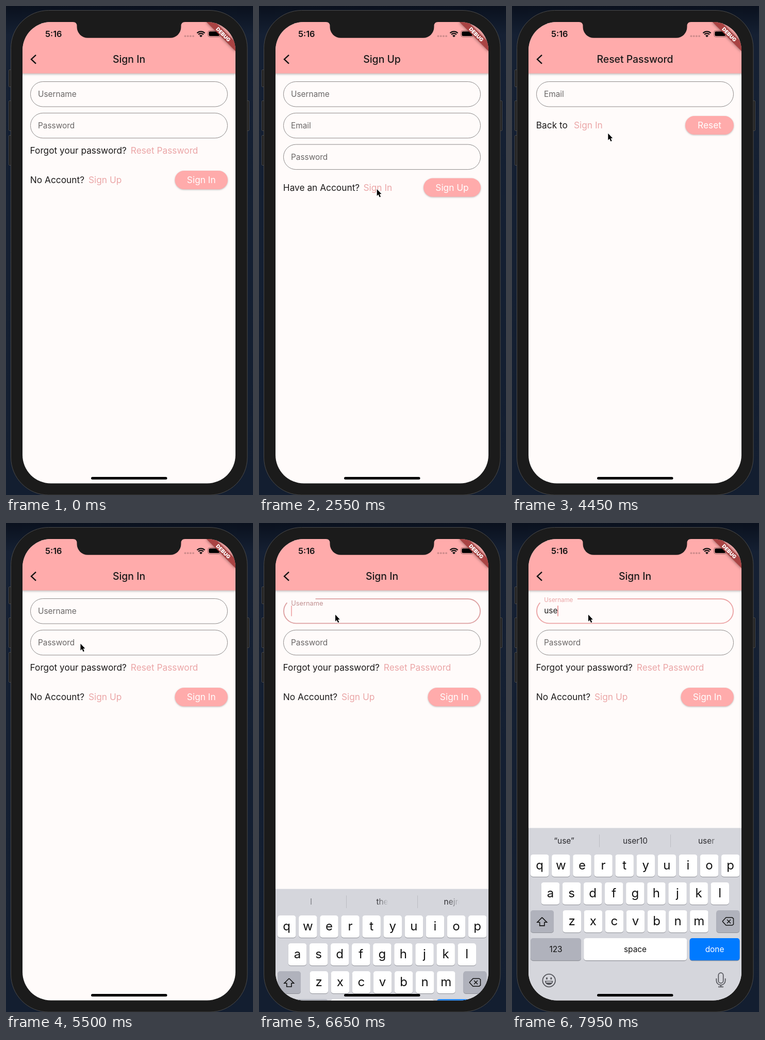
An HTML page with a canvas for the animation above (8000 ms loop, 479x947 px).

```html
<!DOCTYPE html>
<html lang="en">
<head>
<meta charset="utf-8">
<title>Sign in flow</title>
<style>
html, body { margin: 0; width: 100%; height: 100%; overflow: hidden; background: #131e30; }
canvas { display: block; width: 479px; height: 947px; }
</style>
</head>
<body>
<canvas id="stage"></canvas>
<script>
const W = 479, H = 947, LOOP = 8000;
const canvas = document.getElementById('stage');
const c = canvas.getContext('2d');
const dpr = window.devicePixelRatio || 1;
canvas.width = W * dpr;
canvas.height = H * dpr;

const PINK = '#ffabab', LINK = '#eba6a7', INK = '#1c1a1a', GREY = '#8d8a8a', HINT = '#6a6767';
const BODY = 17.3, FIELD = 15.4;

const clamp = v => Math.max(0, Math.min(1, v));
const lerp = (a, b, p) => a + (b - a) * p;
const smooth = p => p * p * (3 - 2 * p);
const span = (t, a, b) => clamp((t - a) / (b - a));
const mix = (a, b, p) => `rgb(${a.map((v, i) => Math.round(lerp(v, b[i], p)))})`;

function rr(x, y, w, h, r) {
  c.beginPath();
  c.roundRect(x, y, w, h, r);
}
function box(x, y, w, h, r, fill) {
  rr(x, y, w, h, r);
  c.fillStyle = fill;
  c.fill();
}
function line(points, width, color) {
  c.beginPath();
  points.forEach(([x, y], i) => i ? c.lineTo(x, y) : c.moveTo(x, y));
  c.lineWidth = width;
  c.strokeStyle = color;
  c.stroke();
}
// cy is the middle of the capital letters
function text(s, x, cy, size, color, align = 'left', weight = 400) {
  c.font = `${weight} ${size}px Inter, sans-serif`;
  c.textAlign = align;
  c.fillStyle = color;
  c.fillText(s, x, cy + size * 0.364);
}

/* ---------- phone ---------- */

function drawPhone() {
  const g = c.createLinearGradient(0, 0, 0, H);
  g.addColorStop(0, '#0a111e');
  g.addColorStop(0.06, '#152033');
  g.addColorStop(1, '#131e30');
  c.fillStyle = g;
  c.fillRect(0, 0, W, H);
  c.lineWidth = 1;
  c.strokeStyle = '#484848';
  for (const [x, y, h] of [[5.5, 123.5, 33], [5.5, 183.5, 58], [5.5, 250.5, 58], [464.5, 183.5, 58]]) {
    box(x, y, 7, h, 1.5, '#202020');
    c.stroke();
  }
  box(9.5, 8.5, 458.5, 938.5, 73, '#1b1b1b');
  c.strokeStyle = '#4a4a4a';
  c.stroke();
}

function drawNotch() {
  c.beginPath();
  c.moveTo(130, 30);
  c.lineTo(130, 31);
  c.quadraticCurveTo(137.5, 31, 137.5, 39);
  c.arcTo(137.5, 61.8, 158, 61.8, 21);
  c.lineTo(319, 61.8);
  c.arcTo(339.5, 61.8, 339.5, 40, 21);
  c.lineTo(339.5, 39);
  c.quadraticCurveTo(339.5, 31, 347, 31);
  c.lineTo(347, 30);
  c.fillStyle = '#1b1b1b';
  c.fill();
}

function drawStatus() {
  text('5:16', 76, 54.5, 16.3, '#111', 'left', 600);
  for (let i = 0; i < 4; i++) {
    c.beginPath();
    c.arc(347.5 + i * 5.2, 58.3, 1.9, 0, 7);
    c.fillStyle = '#cd8b8b';
    c.fill();
  }
  c.strokeStyle = '#111';
  c.lineWidth = 2.3;
  for (const r of [10.6, 6.9]) {
    c.beginPath();
    c.arc(378, 60, r, Math.PI * 1.25, Math.PI * 1.75);
    c.stroke();
  }
  c.beginPath();
  c.moveTo(378, 60.5);
  c.arc(378, 60.5, 4.2, Math.PI * 1.25, Math.PI * 1.75);
  c.fillStyle = '#111';
  c.fill();
  rr(391.5, 47.5, 24, 12.5, 4);
  c.lineWidth = 1;
  c.strokeStyle = '#9c6767';
  c.stroke();
  box(393.3, 49.3, 20.4, 9, 2.4, '#000');
}

function drawBanner() {
  c.save();
  c.translate(421.3, 55);
  c.rotate(Math.PI / 4);
  c.shadowColor = 'rgba(0,0,0,.5)';
  c.shadowBlur = 6 * dpr;
  c.fillStyle = '#a94343';
  c.fillRect(-40, -6, 80, 12);
  c.shadowColor = 'transparent';
  text('DEBUG', 0, 0, 10, '#fff', 'center', 900);
  c.restore();
}

function drawHeader(title) {
  c.save();
  c.shadowColor = 'rgba(0,0,0,.28)';
  c.shadowBlur = 4 * dpr;
  c.shadowOffsetY = 1.5 * dpr;
  c.fillStyle = PINK;
  c.fillRect(25, 25, 427, 105.5);
  c.restore();
  line([[58, 94.8], [49, 103.2], [58, 111.6]], 2.4, '#111');
  text(title, 238.5, 103.2, 19.4, INK, 'center', 500);
}

/* ---------- pages ---------- */

const PAGES = {
  signIn: { title: 'Sign In', fields: ['Username', 'Password'], ask: 'No Account?', link: 'Sign Up',
            linkX: 160, button: 'Sign In', left: 327.5, row: 337 },
  signUp: { title: 'Sign Up', fields: ['Username', 'Email', 'Password'], ask: 'Have an Account?', link: 'Sign In',
            linkX: 202.5, button: 'Sign Up', left: 319, row: 351.6 },
  reset: { title: 'Reset Password', fields: ['Email'], ask: 'Back to', link: 'Sign In',
           linkX: 120, button: 'Reset', left: 336, row: 231 }
};

function pageAt(t) {
  if (t >= 1400 && t < 2750) return PAGES.signUp;
  if (t >= 3800 && t < 5500) return PAGES.reset;
  return PAGES.signIn;
}

function drawField(label, y) {
  rr(47.5, y, 382, 48.5, 24.25);
  c.lineWidth = 1;
  c.strokeStyle = GREY;
  c.stroke();
  text(label, 62, y + 24, FIELD, HINT);
}

const TYPED = [
  [7550, 'u', ['“u”', 'us', 'up']],
  [7650, 'us', ['“us”', 'use', 'user']],
  [7770, 'use', ['“use”', 'user10', 'user']]
];
const typedAt = t => TYPED.filter(k => t >= k[0]).pop();

function drawFocused(label, y, t) {
  const u = span(t, 6570, 6770);
  // material style ease: quick start, soft landing
  const p = u < 0.2 ? 2.6 * u * u : lerp(0.104, 1, 1 - Math.pow(1 - (u - 0.2) / 0.8, 3.4));
  const color = mix([141, 138, 138], [236, 165, 166], clamp(p * 1.25));
  const r = 23.7, l = 48, right = 429, top = y + 0.4, bottom = y + 47.9, mid = (top + bottom) / 2;
  c.beginPath();
  c.moveTo(55 + 72 * Math.pow(p, 0.7), top);
  c.arc(right - r, mid, r, -Math.PI / 2, Math.PI / 2);
  c.arc(l + r, mid, r, Math.PI / 2, lerp(1.5, 1.24, clamp(p * 4)) * Math.PI);
  c.lineWidth = lerp(1, 1.9, clamp(p * 2));
  c.strokeStyle = color;
  c.stroke();
  text(label, 62.2, lerp(y + 24, y + 1.8, p), FIELD * lerp(1, 0.75, p), mix([106, 103, 103], [235, 164, 165], p));

  const word = typedAt(t);
  let x = 63;
  if (word) {
    text(word[1], 62.2, 169, FIELD, INK);
    x = 62.8 + c.measureText(word[1]).width;
  }
  c.globalAlpha = word ? 1 : span(t, 6570, 6670) * (1 - span(t, 7160, 7350));
  c.fillStyle = '#efa3a4';
  c.fillRect(x - 1, 160, 2, 20.5);
  c.globalAlpha = 1;
}

function drawPage(page, t) {
  drawHeader(page.title);
  page.fields.forEach((label, i) => {
    const y = 146.5 + i * 60.8;
    if (i === 0 && t >= 6570) drawFocused(label, y, t);
    else drawField(label, y);
  });
  if (page === PAGES.signIn) {
    text('Forgot your password?', 46.5, 279.3, BODY, INK);
    text('Reset Password', 241.8, 279.3, BODY, LINK);
  }
  text(page.ask, 46.8, page.row, BODY, INK);
  text(page.link, page.linkX, page.row, BODY, LINK);
  c.save();
  c.shadowColor = 'rgba(0,0,0,.26)';
  c.shadowBlur = 3 * dpr;
  c.shadowOffsetY = dpr;
  box(page.left, page.row - 18, 430 - page.left, 36, 18, PINK);
  c.restore();
  text(page.button, (page.left + 430) / 2, page.row, BODY, '#fff', 'center');
}

/* ---------- keyboard ---------- */

const KEY_ROWS = [['qwertyuiop', 36], ['asdfghjkl', 56.7], ['zxcvbnm', 98.5]];

function drawKey(x, y, w, fill = '#fff') {
  box(x, y + 1.1, w, 43, 5, '#8f9198');
  box(x, y, w, 43, 5, fill);
}

function drawSuggestions(t, y) {
  const word = typedAt(t);
  const start = word ? word[0] : 6566;
  const words = word ? word[2] : ['I', 'the', 'nejrd'];
  words.forEach((s, i) => {
    const mid = 101 + i * 138;
    const lag = word && i === 2 ? 60 : 0;
    const edge = mid + lerp(-38, 42, span(t, start + lag, start + lag + 180));
    const g = c.createLinearGradient(edge - 12, 0, edge + 12, 0);
    g.addColorStop(0, 'rgba(40,40,44,1)');
    g.addColorStop(1, 'rgba(40,40,44,0)');
    text(s, mid, y, FIELD, g, 'center');
  });
  for (const x of [169.5, 307.5]) line([[x, y - 12.5], [x, y + 12]], 1, '#bbbdc3');
}

function drawShift(x, y) {
  line([[x, y - 8.5], [x + 9.3, y + 0.8], [x + 4.6, y + 0.8], [x + 4.6, y + 7.5],
        [x - 4.6, y + 7.5], [x - 4.6, y + 0.8], [x - 9.3, y + 0.8], [x, y - 8.5]], 1.6, '#111');
}

function drawDelete(x, y) {
  line([[x - 11, y], [x - 4, y - 7.5], [x + 8, y - 7.5], [x + 10.5, y - 5.5], [x + 10.5, y + 5.5],
        [x + 8, y + 7.5], [x - 4, y + 7.5], [x - 11, y]], 1.5, '#111');
  line([[x - 2, y - 3.6], [x + 5, y + 3.6]], 1.5, '#111');
  line([[x + 5, y - 3.6], [x - 2, y + 3.6]], 1.5, '#111');
}

const ICON = '#53545a';

function drawSmile(x, y) {
  c.lineWidth = 1.8;
  c.strokeStyle = c.fillStyle = ICON;
  c.beginPath();
  c.arc(x, y, 12.3, 0, 7);
  c.stroke();
  for (const d of [-4.2, 4.2]) {
    c.beginPath();
    c.ellipse(x + d, y - 4, 1.5, 2.2, 0, 0, 7);
    c.fill();
  }
  c.beginPath();
  c.arc(x, y + 0.8, 7.8, 0, Math.PI);
  c.closePath();
  c.fill();
  line([[x - 5.5, y + 3], [x + 5.5, y + 3]], 1.8, '#d5d6dc');
}

function drawMic(x, y) {
  c.lineWidth = 1.7;
  c.strokeStyle = ICON;
  rr(x - 4.7, y - 14, 9.4, 20, 4.7);
  c.stroke();
  c.beginPath();
  c.moveTo(x - 8.7, y - 3);
  c.arc(x, y + 1, 8.7, Math.PI, 0, true);
  c.lineTo(x + 8.7, y - 3);
  c.stroke();
  line([[x, y + 9.7], [x, y + 13.2]], 1.7, ICON);
  line([[x - 5, y + 13.2], [x + 5, y + 13.2]], 1.7, ICON);
}

function drawKeyboard(t) {
  if (t < 6600) return;
  // critically damped spring
  const s = 0.01765 * (t - 6526);
  const top = 925 - 334.4 * (1 - (1 + s) * Math.exp(-s));
  c.fillStyle = '#d5d6dc';
  c.fillRect(25, top, 427, H - top);
  drawSuggestions(t, top + 25.2);
  KEY_ROWS.forEach(([keys, x0], row) => {
    const y = top + 51.3 + row * 54;
    [...keys].forEach((k, i) => {
      const x = x0 + i * 41.1;
      drawKey(x, y, 35.5);
      text(k, x + 17.7, y + 20.2, 24, '#111', 'center');
    });
  });
  const y3 = top + 159.3, y4 = top + 213.5;
  drawKey(36, y3, 45, '#b0b2bc');
  drawShift(58.3, y3 + 22.5);
  drawKey(396.3, y3, 45, '#b0b2bc');
  drawDelete(419, y3 + 21.7);
  drawKey(36, y4, 98, '#b0b2bc');
  drawKey(139.2, y4, 200, '#fff');
  drawKey(344.5, y4, 97, '#007aff');
  text('123', 85, y4 + 21.3, FIELD, '#111', 'center');
  text('space', 239, y4 + 21, FIELD, '#111', 'center');
  text('done', 393, y4 + 21, FIELD, '#fff', 'center');
  drawSmile(71.7, top + 295.4);
  drawMic(405, top + 294.5);
}

/* ---------- pointer ---------- */

const MOVES = [
  [300, 1100, 202, 341.7],
  [1700, 2100, 234, 349],
  [2300, 2400, 228.7, 354.7],
  [3000, 3450, 311, 281.5],
  [4050, 4650, 143.2, 234.6],
  [4950, 5050, 144.5, 233.7],
  [5650, 6350, 148, 177.5]
];

function drawPointer(t) {
  if (t < 100) return;
  let x = 448.5, y = 774.5;
  for (const [a, b, nx, ny] of MOVES) {
    const p = smooth(span(t, a, b));
    x = lerp(x, nx, p);
    y = lerp(y, ny, p);
  }
  c.save();
  c.translate(x, y);
  c.beginPath();
  [[0, 0], [0, 13], [2.9, 10.4], [5.1, 15.6], [7.3, 14.6], [5.1, 9.6], [8.8, 9.4]].forEach(q => c.lineTo(...q));
  c.closePath();
  c.lineWidth = 1.6;
  c.lineJoin = 'round';
  c.strokeStyle = 'rgba(255,255,255,.85)';
  c.stroke();
  c.fillStyle = '#000';
  c.fill();
  c.restore();
}

function draw(t) {
  c.setTransform(dpr, 0, 0, dpr, 0, 0);
  drawPhone();
  c.save();
  rr(32, 31, 413, 893.5, 55);
  c.clip();
  c.fillStyle = '#fffbfa';
  c.fillRect(32, 30, 414, 895);
  drawPage(pageAt(t), t);
  drawStatus();
  drawKeyboard(t);
  drawBanner();
  drawNotch();
  box(165, 912, 147.5, 5, 2.5, '#000');
  c.restore();
  drawPointer(t);
}

const begin = performance.now();
function tick() {
  draw((performance.now() - begin) % LOOP);
  requestAnimationFrame(tick);
}
tick();
</script>
</body>
</html>
```
